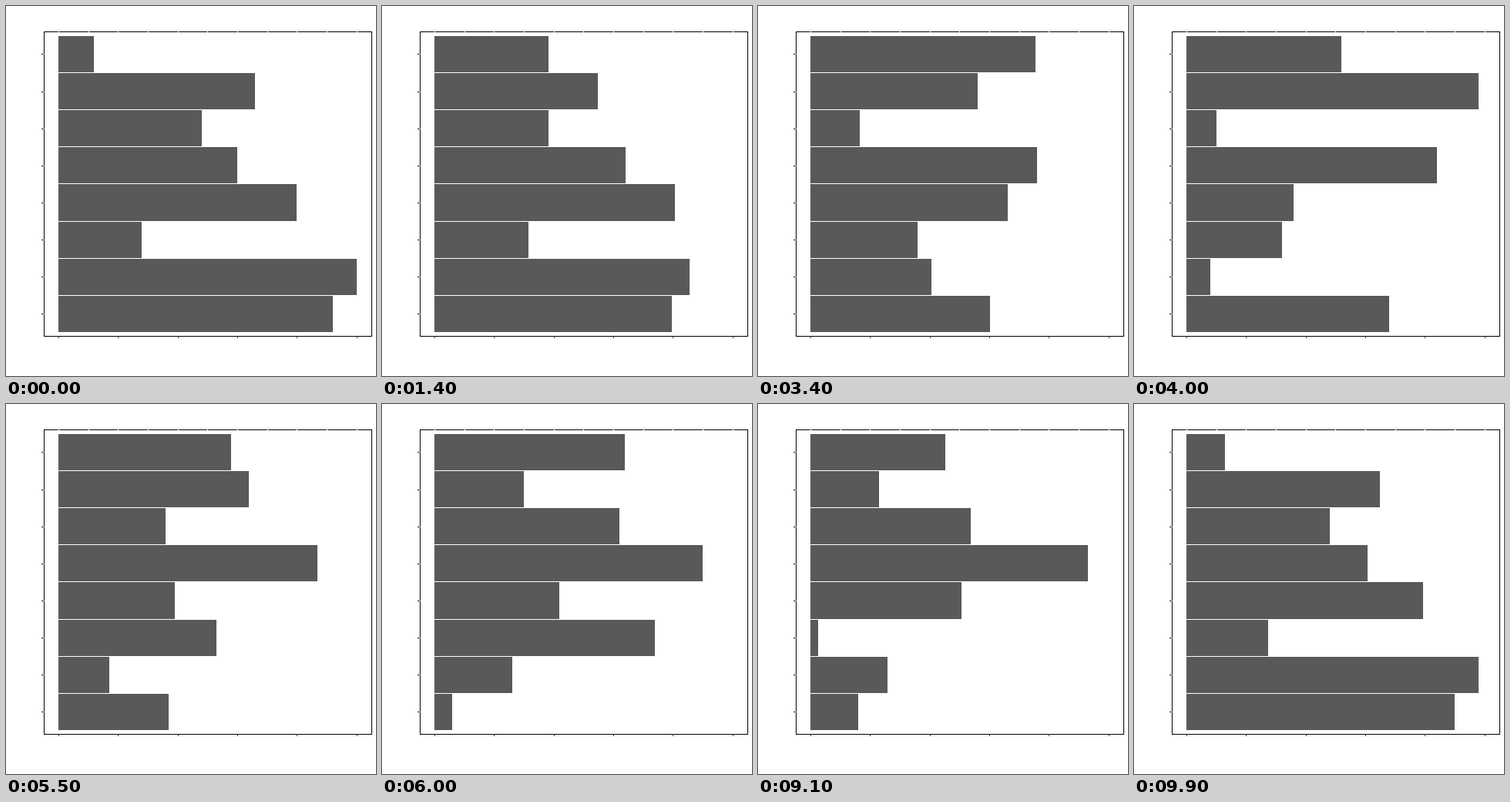
Recreate the animation shown at these times as an HTML page with a canvas. Size 480 px wide and 480 px high, loop 10 s.

```html
<!DOCTYPE html>
<html lang="en">
<head>
<meta charset="utf-8">
<title>Bar chart transitions</title>
<style>
html, body { margin: 0; width: 100%; height: 100%; overflow: hidden; background: #fff; }
canvas { display: block; }
</style>
</head>
<body>
<canvas id="chart" width="480" height="480"></canvas>
<script>
const ctx = document.getElementById('chart').getContext('2d');
const ROWS = 8, STATES = 5, MAX = 50;

// Mersenne Twister, seeded by a linear congruence; valid for the first 227 draws
function twister(seed) {
  const next = () => seed = Math.imul(69069, seed) + 1 | 0;
  for (let i = 0; i < 51; i++) next();
  const state = Array.from({ length: 624 }, next);
  let k = 0;
  return () => {
    const mix = (state[k] & 0x80000000) | (state[k + 1] & 0x7fffffff);
    let y = state[k + 397] ^ (mix >>> 1) ^ (mix & 1 ? 0x9908b0df : 0);
    k++;
    y ^= y >>> 11;
    y ^= (y << 7) & 0x9d2c5680;
    y ^= (y << 15) & 0xefc60000;
    y ^= y >>> 18;
    return (y >>> 0) / 2 ** 32;
  };
}

// Draws distinct numbers from 1 to max
function sample(max, count, random) {
  const pool = Array.from({ length: max }, (_, i) => i + 1);
  return Array.from({ length: count }, () => {
    const i = Math.floor(pool.length * random());
    const value = pool[i];
    pool[i] = pool[pool.length - 1];
    pool.pop();
    return value;
  });
}

const values = sample(MAX, ROWS * STATES, twister(42));
// Within a state the values run from the bottom row up
const valueAt = (state, row) => values[state % STATES * ROWS + ROWS - 1 - row];

const xOf = value => Math.round(68.02 + value * 116 / 15);
const topOf = row => Math.round(38.9 + row * 48.14);

function box(color, x, y, w, h) {
  ctx.fillStyle = color;
  ctx.fillRect(x, y, w, h);
}

function drawPanel() {
  box('#fff', 0, 0, 480, 480);
  box('#000', 49, 33, 426, 396);
  box('#fff', 50, 34, 424, 394);
  // White grid lines cut the top and left borders
  for (let v = 0; v <= MAX; v += 5) box('#fff', xOf(v), 33, 1, 1);
  for (let v = 0; v <= MAX; v += 10) box('#333', xOf(v), 428, 1, 3);
  for (let row = 0; row < ROWS; row++) {
    const y = Math.round(62.4 + row * 48.14);
    box('#fff', 49, y, 1, 1);
    box('#333', 46, y, 3, 1);
  }
}

function draw(ms) {
  const time = ms % (STATES * 2000);
  const state = Math.floor(time / 2000);
  // Hold for one second, then move in ten steps
  const step = Math.max(0, Math.floor(time % 2000 / 100) - 10);
  const ease = (1 - Math.cos(Math.PI * step / 10)) / 2;

  drawPanel();
  for (let row = 0; row < ROWS; row++) {
    const from = valueAt(state, row), to = valueAt(state + 1, row);
    const top = topOf(row);
    box('#595959', 68, top, xOf(from + (to - from) * ease) - 68, topOf(row + 1) - 1 - top);
  }
}

const start = performance.now();
function tick() {
  draw(performance.now() - start);
  requestAnimationFrame(tick);
}
tick();
</script>
</body>
</html>
```
